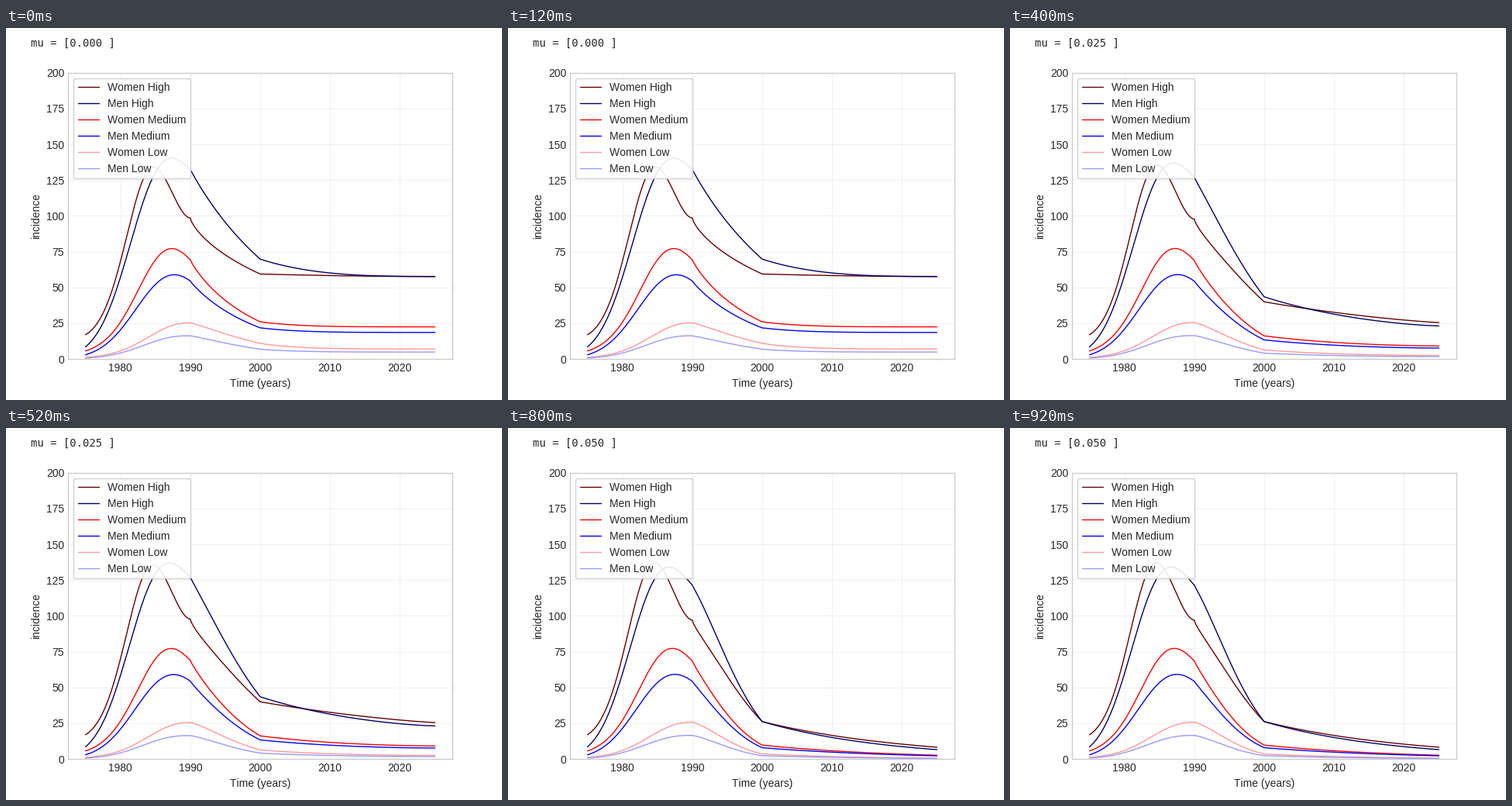
Animation, 640 px wide and 480 px high, one loop 1 s. Source, as a matplotlib script:

```python
import matplotlib.pyplot as plt
import numpy as np
from matplotlib.animation import FuncAnimation

STEPS = 5
MU_STEP = 0.0125

plt.style.use("seaborn-v0_8-whitegrid")
plt.rcParams.update({"font.family": "Liberation Sans", "font.size": 10,
                     "lines.linewidth": 1, "grid.alpha": 0.25,
                     "text.kerning_factor": 6})

RISE_YEARS = np.array([0, 4, 8, 12, 15])     # since 1975
DROP_POWERS = np.array([1, 1.05, 1.25])      # response to mu at 1990, 2000, 2025


class Group:
    """Log incidence in three phases: epidemic rise, fall and settling tail.

    rise: incidence at RISE_YEARS; ends: incidence in 2000 and 2025;
    drop: log loss in 1990, 2000 and 2025 at the highest mu;
    bend: curvature of the fall; settle: how early the tail flattens.
    """

    def __init__(self, label, color, rise, ends, drop, bend, settle):
        self.label, self.color = label, color
        self.rise = np.polyfit(RISE_YEARS, np.log(rise), 4)
        self.levels = np.log([rise[-1], *ends])
        self.drop = np.array(drop)
        self.bend, self.settle = bend, settle

    def curve(self, u):
        """Years and incidence for mu at fraction u of its range."""
        loss = self.drop * u**DROP_POWERS
        peak, turn, end = self.levels - loss
        s = np.linspace(0, 1, 201)

        rise = (np.polyval(self.rise, 15 * s)
                + 0.35 * u * s * (1 - s)**2 - loss[0] * s**2)
        fall = (peak + (self.levels[1] - self.levels[0]) * s**self.bend
                - (loss[1] - loss[0]) * s**1.9)
        ease = 1 - (1 - s)**(1 + self.settle * (1 - u)**2.2)
        tail = turn + (end - turn) * ease

        years = np.r_[1975 + 15 * s, 1990 + 10 * s, 2000 + 25 * s]
        return years, np.exp(np.r_[rise, fall, tail])


groups = [
    Group("Women High", "#660000", rise=(17, 51, 122.5, 120.3, 98.5),
          ends=(59.4, 57.6), drop=(0.015, 0.82, 1.94), bend=0.74, settle=0.8),
    Group("Men High", "#000066", rise=(8.5, 42.5, 106, 140, 132.5),
          ends=(69.8, 57.7), drop=(0.087, 0.98, 2.17), bend=0.97, settle=2),
    Group("Women Medium", "#ff0000", rise=(5.7, 19.2, 52.5, 77, 69.3),
          ends=(26, 22.5), drop=(0.012, 0.98, 2.13), bend=0.9, settle=3.2),
    Group("Men Medium", "#0000ff", rise=(3, 15, 40.2, 58.4, 54.5),
          ends=(21.8, 18.6), drop=(0.004, 1.01, 2.1), bend=0.93, settle=3.2),
    Group("Women Low", "#ff9999", rise=(1.2, 4.2, 12.5, 22.8, 25.3),
          ends=(11, 7.1), drop=(-0.016, 1.12, 2.45), bend=1.2, settle=3.2),
    Group("Men Low", "#9999ff", rise=(0.7, 3.1, 9, 15.1, 16.2),
          ends=(6.9, 4.9), drop=(-0.018, 1.06, 2.45), bend=1.2, settle=3.2),
]

fig, ax = plt.subplots(figsize=(6.4, 4.8), dpi=100)
lines = [ax.plot([], [], color=g.color, label=g.label)[0] for g in groups]
ax.set(xlim=(1972.5, 2027.5), ylim=(0, 200),
       xticks=range(1980, 2021, 10), yticks=range(0, 201, 25),
       xlabel="Time (years)", ylabel="incidence")
ax.legend(loc="upper left", frameon=True, framealpha=0.9)
mu_text = fig.text(0.05, 0.95, "", family="DejaVu Sans Mono")


def update(step):
    mu_text.set_text(f"mu = [{step * MU_STEP:.3f} ]")
    for line, group in zip(lines, groups):
        line.set_data(*group.curve(step / (STEPS - 1)))
    return [mu_text, *lines]


animation = FuncAnimation(fig, update, frames=STEPS, interval=200,
                          repeat=True, repeat_delay=0)
plt.show()
```
